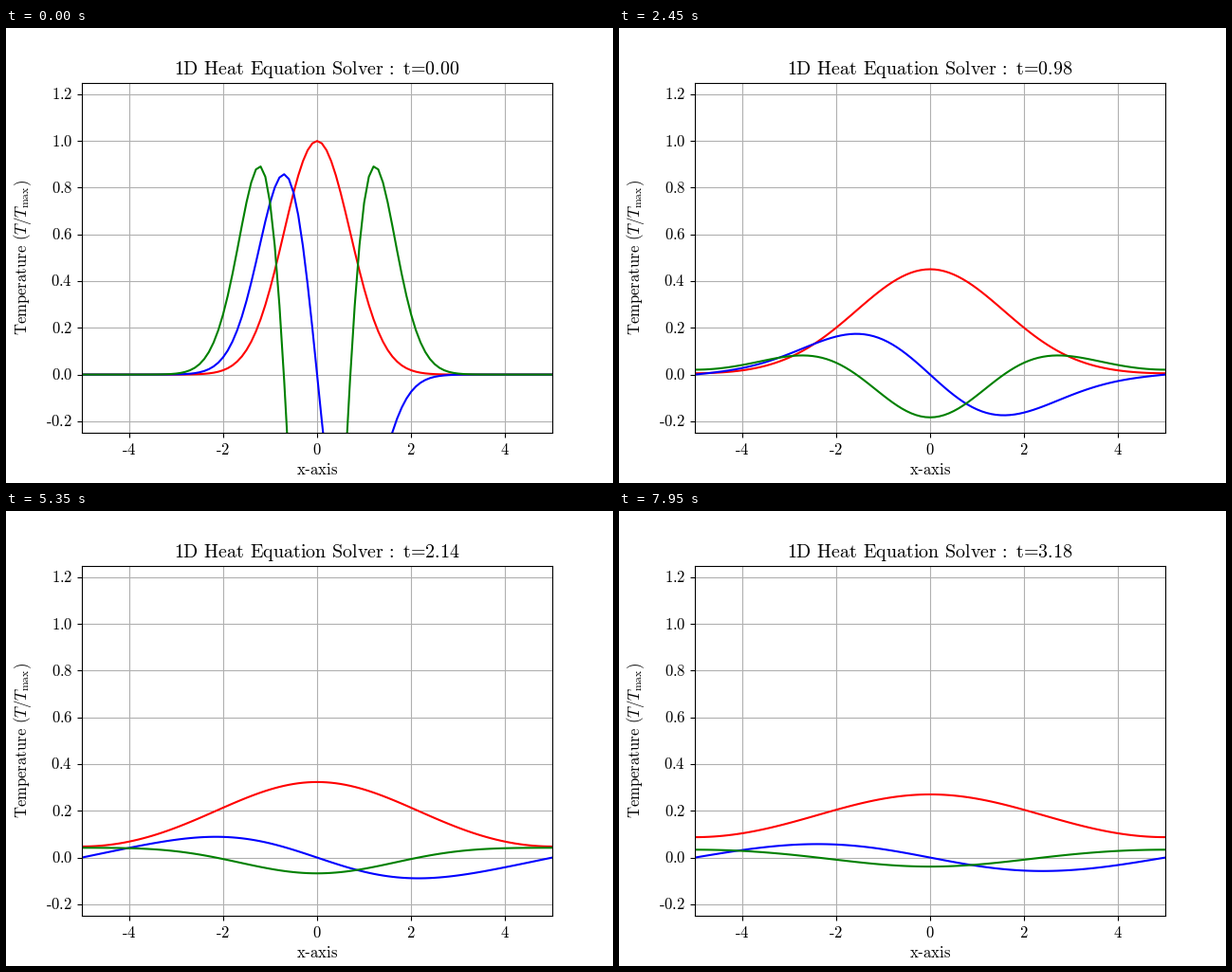
A matplotlib script that plays this animation: 640x480 px, repeating every 8000 ms.

```python
import numpy as np
import matplotlib.pyplot as plt
from matplotlib.animation import FuncAnimation

W, H = 640, 480
FRAMES, INTERVAL = 160, 50
DT = 0.02
PERIOD = 10

plt.rcParams["mathtext.fontset"] = "cm"

x = np.linspace(-5, 5, 101)
images = x[:, None] + PERIOD * np.arange(-3, 4)


def heat(t):
    """Periodic heat kernel started from exp(-x^2), with its two derivatives."""
    s = 1 + 4 * t
    g = np.exp(-images**2 / s) / np.sqrt(s)
    first = -2 * images / s * g
    second = (4 * images**2 / s**2 - 2 / s) * g
    return [u.sum(axis=1) for u in (g, first, second)]


def roman(s):
    return r"\text{" + s + "}"


def math(*parts):
    return "$" + "".join(parts) + "$"


def title_text(t):
    # TeX widens the space after a colon
    return math(roman("1D Heat Equation Solver : "), r"\hspace{0.126}",
                roman(f"t={t:.2f}"))


fig = plt.figure(figsize=(W / 100, H / 100), dpi=100, facecolor="white")
ax = fig.add_axes([0.125, 0.11, 0.775, 0.77])
ax.set(xlim=(-5, 5), ylim=(-0.25, 1.25))
ax.grid(True)


def put(px, py, s, size=12, ha="center", **kw):
    """Text with its baseline at a pixel position measured from the top left."""
    return fig.text(px / W, 1 - py / H, s, fontsize=size, ha=ha, va="baseline", **kw)


xticks = np.arange(-4, 5, 2)
yticks = np.arange(-1, 7) * 0.2
ax.set_xticks(xticks, labels=[""] * len(xticks))
ax.set_yticks(yticks, labels=[""] * len(yticks))

for v in xticks:
    put(328 + 49.6 * v, 450, math(roman(f"{v}")))
for v in yticks:
    put(70.3, 365.6 - 246.4 * v + 5.4, math(roman(f"{v:.1f}")), ha="right")

put(328, 471, math(roman("x\u2010axis")))
put(22, 242, math(roman("Temperature ("), r"T/T_{\mathrm{max}}", roman(")")),
    rotation=90, rotation_mode="anchor")
title = put(328, 49, title_text(0), size=14.4)

lines = [ax.plot(x, u, color=c, lw=1.5)[0] for u, c in zip(heat(0), "rbg")]


def update(i):
    t = i * DT
    for line, u in zip(lines, heat(t)):
        line.set_ydata(u)
    title.set_text(title_text(t))
    return [*lines, title]


anim = FuncAnimation(fig, update, frames=FRAMES, interval=INTERVAL,
                     repeat=True, repeat_delay=0, blit=False)
plt.show()
```
